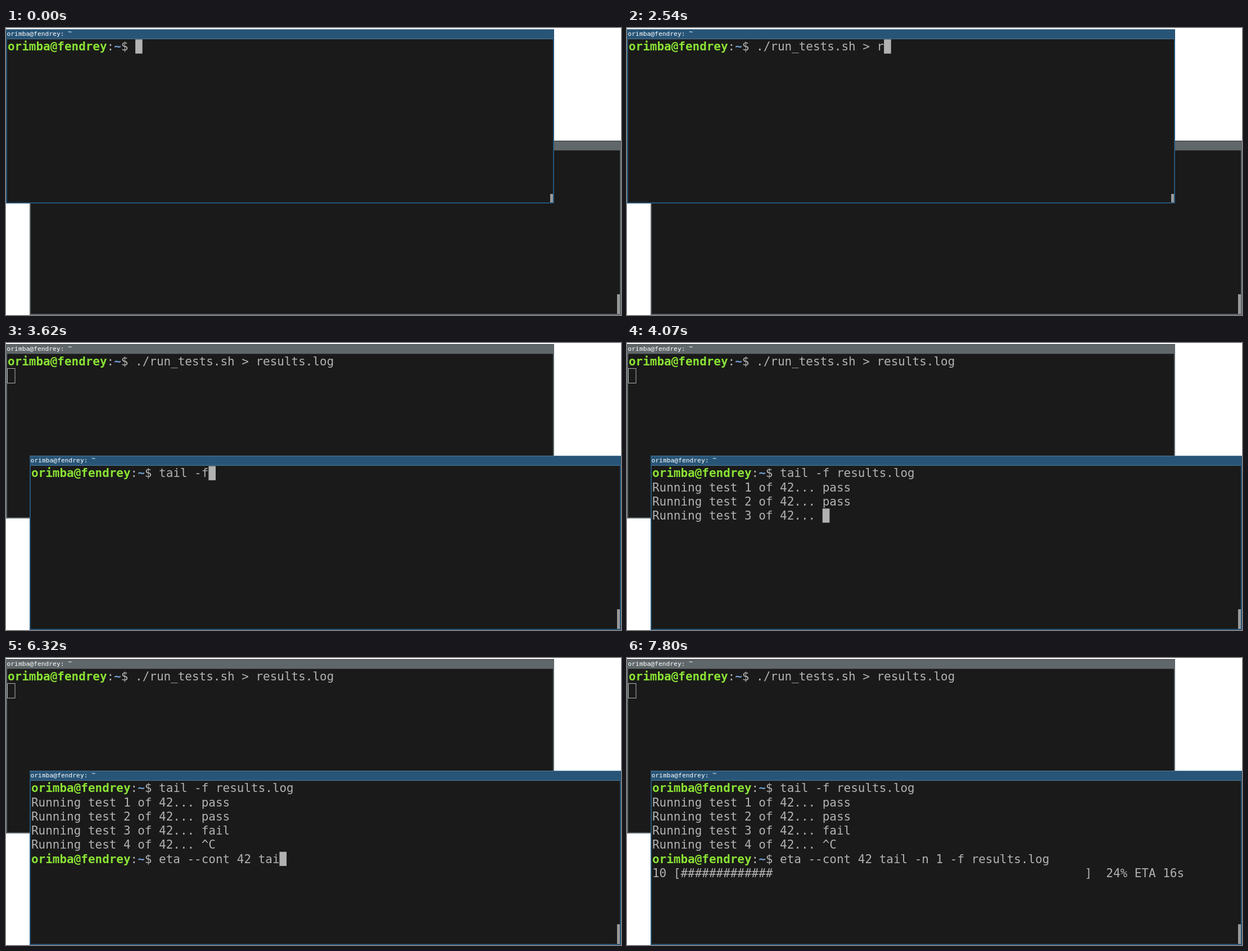
Recreate the animation shown at these times as an HTML page with a canvas. Size 1094 by 512 pixels, loop 8000 ms.

```html
<!DOCTYPE html>
<html lang="en">
<head>
<meta charset="utf-8">
<title>Two terminals</title>
<style>
  html, body { margin: 0; width: 100%; height: 100%; overflow: hidden; background: #fff; }
  canvas { display: block; }
</style>
</head>
<body>
<canvas id="stage" width="1094" height="512"></canvas>
<script>
const ctx = document.getElementById('stage').getContext('2d');
const LOOP = 8000, CELL = 12.614, LINE = 25.23;
const MONO = '"DejaVu Sans Mono", monospace';
const USER = 'orimba@fendrey', PROMPT = 18;
const GREY = '#b2b2b2', GREEN = '#8ae234', BLUE = '#729fcf', DARK = '#1a1a1a';

const upper = { x: 0, y: 2, w: 975, h: 311, left: 3, top: 20.4, bar: 15 };
const lower = { x: 42, y: 201, w: 1052, h: 311, left: 45, top: 219.6, bar: 35 };

const RUN = './run_tests.sh > results.log';
const TAIL = 'tail -f results.log';
const ETA = 'eta --cont 42 tail -n 1 -f results.log';

function box(color, x, y, w, h) {
  ctx.fillStyle = color;
  ctx.fillRect(x, y, w, h);
}

// Monospaced text, one glyph per cell
function glyphs(text, x, y, step, font, color) {
  ctx.font = font + ' ' + MONO;
  ctx.fillStyle = color;
  [...text].forEach((c, i) => c !== ' ' && ctx.fillText(c, x + i * step, y));
}

function put(win, row, col, text, color = GREY, weight = 'normal') {
  const y = Math.round(win.top + row * LINE + 19.85);
  glyphs(text, win.left + col * CELL, y, CELL, weight + ' 20.95px', color);
}

function prompt(win, row, command = '') {
  put(win, row, 0, USER, GREEN, 'bold');
  put(win, row, 14, ':');
  put(win, row, 15, '~', BLUE, 'bold');
  put(win, row, 16, '$ ' + command);
}

function cursor(win, row, col) {
  box(GREY, win.left + col * CELL, win.top + row * LINE, CELL, LINE);
}

function frame(win, focused) {
  const { x, y, w, h, bar } = win;
  const line = focused ? '#4c7899' : '#333333';
  box(focused ? '#285577' : '#5f676a', x, y, w, h);
  box(line, x, y, w, 1);
  box(line, x + 2, y + 17, w - 4, 1);
  box(DARK, x + 2, y + 18, w - 4, h - 20);
  box('#999', x + w - 7, y + h - 2 - bar, 5, bar);
  glyphs(USER + ':', x + 1.5, y + 12, 6.8, '11.2px', '#fff');
  glyphs('~', x + 1.5 + 16 * 6.8, y + 9, 6.8, '11.2px', '#fff');
}

// Text typed so far, shown in 40 ms steps
function typed(text, start, t, phase = start) {
  if (t < start) return '';
  const shown = phase + Math.floor((t - phase) / 40) * 40;
  return text.slice(0, Math.max(1, 1 + Math.floor((shown - start) / 33)));
}

function progress(n, left) {
  const part = n / 42;
  return String(n).padStart(2) + ' [' + '#'.repeat(57 * part).padEnd(57) +
    ']  ' + Math.round(part * 100) + '% ETA ' + left;
}

function drawUpper(t) {
  const focused = t < 2940;
  frame(upper, focused);
  const cmd = typed(RUN, 1970, t, 1980);
  prompt(upper, 0, cmd);
  if (!focused) {
    ctx.strokeStyle = GREY;
    ctx.strokeRect(2.5, 45.5, 13.5, 26);
  } else if (t < 550 || (t >= 1150 && t < 1750) || t >= 1970) {
    cursor(upper, 0, PROMPT + cmd.length);
  }
}

function drawLower(t) {
  frame(lower, t >= 2940);
  const tail = typed(TAIL, 3420, t);
  prompt(lower, 0, tail);
  if (t < 2940) return;
  if (t < 4070) return cursor(lower, 0, PROMPT + tail.length);

  const ends = ['pass', 'pass', t < 4380 ? '' : 'fail'];
  if (t >= 4380) ends.push(t < 4770 ? '' : '^C');
  ends.forEach((end, i) => put(lower, i + 1, 0, `Running test ${i + 1} of 42... ${end}`));
  if (t < 4770) {
    if (t < 4620 || t >= 4730) cursor(lower, ends.length, 24);
    return;
  }

  const eta = typed(ETA, 5760, t, t < 6570 ? 5760 : 6570);
  prompt(lower, 5, eta);
  if (t < 7050) {
    if (t < 5330 || t >= 5760) cursor(lower, 5, PROMPT + eta.length);
    return;
  }

  if (t < 7310) return cursor(lower, 6, 0);
  put(lower, 6, 0, t < 7800 ? progress(9, 'N/A') : progress(10, '16s'));
  if (t < 7600) cursor(lower, 6, 75);
}

function draw(now) {
  const t = now % LOOP;
  box('#fff', 0, 0, 1094, 512);
  const order = t < 2940 ? [drawLower, drawUpper] : [drawUpper, drawLower];
  order.forEach(paint => paint(t));
}

const begin = performance.now();
function tick() {
  draw(performance.now() - begin);
  requestAnimationFrame(tick);
}
tick();
</script>
</body>
</html>
```
